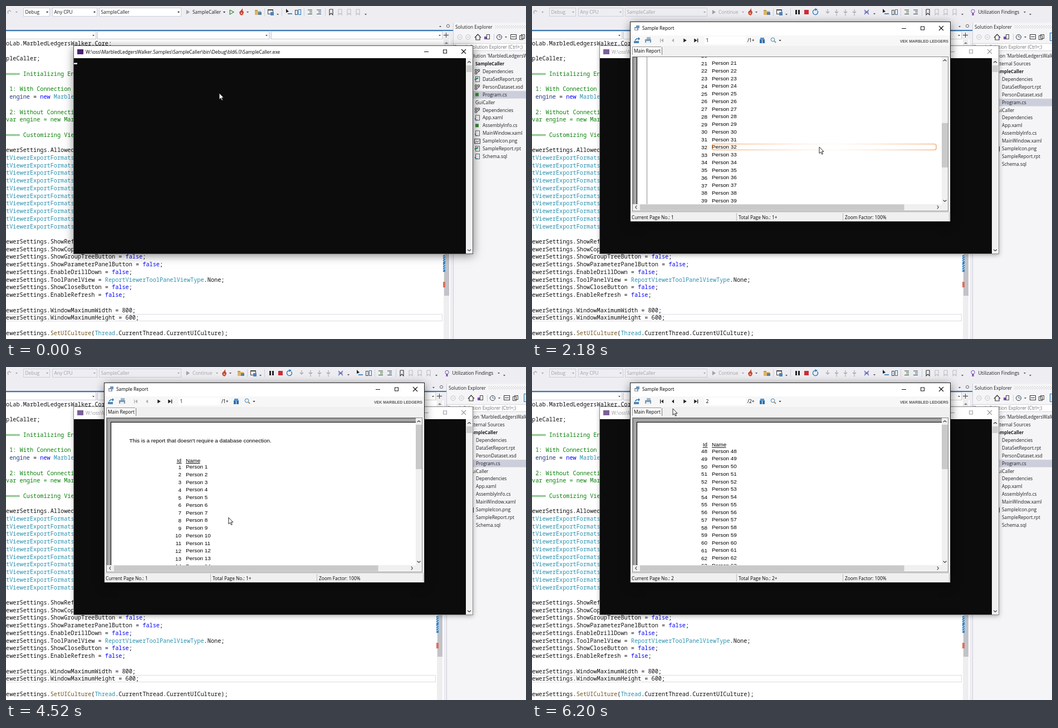
An HTML page with a canvas for the animation above (6280 ms loop, 934x600 px).

```html
<!DOCTYPE html>
<html lang="en">
<head>
<meta charset="utf-8">
<style>
html, body { margin: 0; width: 100%; height: 100%; overflow: hidden; background: #eeeef2; }
canvas { display: block; }
</style>
</head>
<body>
<canvas id="stage" width="934" height="600"></canvas>
<script>
const ctx = document.getElementById('stage').getContext('2d');
const LOOP = 6280, ROW = 13.75, TICK = 88;
const UI = '8.35px "Open Sans", sans-serif';
const UI_BOLD = 'bold 7.95px "Open Sans", sans-serif';
const REPORT = '9.8px "Liberation Sans", Arial, sans-serif';
const CODE = '10.23px "Noto Sans Mono", monospace';
const INK = '#1e1e1e', DIM = '#a2a2a6', CHROME = '#eeeef2', FACE = '#f0f0f0';

// Drawing helpers
function text(s, x, y, color = INK, font = UI, align = 'left') {
  ctx.font = font; ctx.fillStyle = color; ctx.textAlign = align;
  ctx.fillText(s, x, y);
}
function rect(x, y, w, h, color) { ctx.fillStyle = color; ctx.fillRect(x, y, w, h); }
function frame(x, y, w, h, color, lw = 1) {
  ctx.strokeStyle = color; ctx.lineWidth = lw;
  ctx.strokeRect(x + .5, y + .5, w - 1, h - 1);
}
function trace(p) {
  ctx.beginPath();
  for (let i = 0; i < p.length; i += 2) ctx.lineTo(p[i], p[i + 1]);
}
function line(color, lw, ...p) { trace(p); ctx.strokeStyle = color; ctx.lineWidth = lw; ctx.stroke(); }
function poly(color, ...p) { trace(p); ctx.closePath(); ctx.fillStyle = color; ctx.fill(); }
function circle(x, y, r, color, fill) {
  ctx.beginPath(); ctx.arc(x, y, r, 0, 7);
  if (fill) { ctx.fillStyle = color; ctx.fill(); }
  else { ctx.strokeStyle = color; ctx.lineWidth = 1; ctx.stroke(); }
}
const caret = (x, y, c = '#555') => poly(c, x - 2, y - 1, x + 2, y - 1, x, y + 1.5);
const play = (x, y, c, s = 4) => poly(c, x - s * .8, y - s, x + s * .8, y, x - s * .8, y + s);
const back = (x, y, c) => poly(c, x + 2, y - 3.5, x - 2, y, x + 2, y + 3.5);
const chevron = (x, y, dx, dy) =>
  line('#404040', 1.2, x - dx - 2.5 * dy, y - dy - 2.5 * dx, x + dx, y + dy, x - dx + 2.5 * dy, y - dy + 2.5 * dx);
function bars(x, y, c) {
  for (let i = 0; i < 4; i++) line(i % 3 ? c : '#444', 1, x - (i % 3 ? 1 : 4), y - 4 + i * 2.5, x + 4, y - 4 + i * 2.5);
}
function bookmark(x, c) { line(c, 1.1, x - 3, 6, x + 3, 6, x + 3, 16, x, 13, x - 3, 16, x - 3, 6); }
function folder(x) { rect(x - 6, 7, 5, 3, '#c89a3c'); rect(x - 6, 9, 11, 7, '#dcb667'); rect(x, 11, 6, 5, '#5b7fa6'); }
function windowIcon(x) { frame(x - 5, 6, 10, 9, '#444'); line('#444', 2, x - 5, 7, x + 5, 7); rect(x, 11, 6, 6, '#4d83bd'); }
function flame(x) { poly('#c8442f', x - 4, 11, x - 1, 8, x + 2, 4, x + 2, 8, x + 4, 11, x + 3, 15, x, 17, x - 3, 15); circle(x, 13, 1.5, '#f3b09a', true); }
function titleButtons(right, y, c) {
  line(c, 1, right - 88, y + .5, right - 80, y + .5);
  frame(right - 54, y - 3.5, 7, 7, c);
  line(c, 1.1, right - 21, y - 4, right - 13, y + 4);
  line(c, 1.1, right - 13, y - 4, right - 21, y + 4);
}
function shadowed(x, y, w, h, blur, alpha) {
  ctx.save();
  ctx.shadowColor = `rgba(0,0,0,${alpha})`; ctx.shadowBlur = blur; ctx.shadowOffsetY = 3;
  rect(x, y, w, h, '#fff');
  ctx.restore();
}

// Source editor: '|' splits runs, the first letter of each picks its colour
const COLORS = { k: '#111', g: '#078007', b: '#00f', t: '#2b91af', n: '#1f377f', m: '#74531f' };
const prop = (s) => 'kewerSettings.' + s;
const off = (s) => prop(s + ' = |bfalse|k;');
const LINES = [
  'koLab.MarbledLedgersWalker.Core;', '', 'kpleCaller;', '', 'g════ Initializing En', '',
  'g 1: With Connection', 'n engine|k = |bnew|t Marble', '',
  'g 2: Without Connecti', 'gvar engine = new Mar', '', 'g════ Customizing Vie', '',
  prop('Allowed'), ...Array(10).fill('ttViewerExportFormats'), '',
  prop('ShowRef'), prop('ShowCop'), off('ShowGroupTreeButton'), off('ShowParameterPanelButton'),
  off('EnableDrillDown'), prop('ToolPanelView = |tReportViewerToolPanelViewType|k.None;'),
  off('ShowCloseButton'), off('EnableRefresh'), '',
  prop('WindowMaximumWidth = 800;'), prop('WindowMaximumHeight = 600;'), '',
  prop('|mSetUICulture|k(|tThread|k.CurrentThread.CurrentUICulture);')
];
function editor(dx) {
  const right = 784 + dx;
  rect(0, 43, right + 19, 2, '#3b78b5');
  rect(0, 45, right + 14, 555, '#fff');
  rect(0, 45, right + 14, 15, CHROME);
  [[-2, 162], [164, 473], [476, right]].forEach(([a, b]) => {
    rect(a, 46, b - a, 13, '#fff'); frame(a, 45, b - a, 15, '#cccedb'); caret(b - 5, 53);
  });
  line('#444', 1.2, right + 2, 52.5, right + 11, 52.5);
  line('#444', 1, right + 6.5, 48, right + 6.5, 57);
  caret(right - 4, 37);
  circle(right + 10, 36, 2.6, '#666');
  rect(right + 2, 60, 10, 540, '#eeeef0');
  poly('#777', right + 4, 68, right + 7, 65, right + 10, 68);
  rect(right + 3, 74, 9, 448, '#c2c3c9');
  [449, 464].forEach((y) => {
    rect(right + 1, y, 4, 15, '#2f86c9');
    for (let k = 2; k < 14; k += 4) line('#fff', 1, right + 1, y + k + 2, right + 5, y + k - 1);
  });
  rect(right + 1, 497, 4, 10, '#d9705f');
  frame(-2, 555, right + 2, 13, '#dcdce4');
  LINES.forEach((row, i) => {
    let x = 0;
    for (const run of row.split('|')) {
      const s = run.slice(1);
      text(s, x, 71 + i * 13.73, COLORS[run[0]], (run[0] === 't' ? '500 ' : '') + CODE);
      x += ctx.measureText(s).width;
    }
  });
}

function toolbar(debugging) {
  rect(0, 0, 934, 43, CHROME);
  line(DIM, 1.2, 4, 14, 3, 10, 6, 8, 9, 10); caret(19, 11, DIM);
  const ink = debugging ? DIM : INK;
  [['Debug', 31, 79], ['Any CPU', 83, 164], ['SampleCaller', 167, 315]].forEach(([s, a, b]) => {
    if (!debugging) rect(a, 3, b - a, 15, '#fff');
    frame(a, 3, b - a, 16, '#cccedb'); text(s, a + 3.5, 14, ink); caret(b - 5, 11, ink);
  });
  play(327, 11, DIM);
  text(debugging ? 'Continue' : 'SampleCaller', 335, 14, ink);
  caret(debugging ? 379 : 392, 11, ink);
  if (!debugging) line('#388a34', 1.2, 402, 7, 409, 11, 402, 15, 402, 7);
  const a = debugging ? -31 : 0, b = debugging ? 127 : 0;
  flame(423 + a); caret(434 + a, 11); folder(453 + a); windowIcon(475 + a); caret(488 + a, 15);
  [464 + a, 495 + a, 535 + b, 573 + b].forEach((x) => line('#cccedb', 1, x + .5, 4, x + .5, 18));
  if (debugging) {
    rect(473, 7, 3, 8, '#222'); rect(478, 7, 3, 8, '#222'); rect(489, 7, 8, 8, '#d02b35');
    ctx.beginPath(); ctx.arc(509, 11, 4.5, -.7, 4.6);
    ctx.strokeStyle = '#2a75bb'; ctx.lineWidth = 1.4; ctx.stroke();
    poly('#2a75bb', 508, 4, 513, 6, 509, 9);
    [531, 547, 563, 579].forEach((x, i) => {
      line(DIM, 1.1, x, 6, x, 13); line(DIM, 1.1, x - 3, 10, x, 13, x + 3, 10);
      if (i) circle(x, 16, 1, DIM, true);
    });
    line('#7b4bb0', 1.2, 597, 7, 605, 15); line('#2a75bb', 1.2, 597, 15, 605, 7); line('#7b4bb0', 1, 597, 11, 605, 11);
    caret(615, 14);
    circle(792, 9.5, 3.2, '#7b4bb0'); rect(790.5, 13, 3, 4, '#7b4bb0');
    text('Utilization Findings', 801.5, 14); caret(885, 11); caret(895, 15);
  }
  poly('#222', 503 + b, 5, 503 + b, 12, 508 + b, 10); line('#2a75bb', 1.6, 506 + b, 14, 514 + b, 14);
  frame(519 + b, 7, 5, 9, '#444'); frame(525 + b, 6, 5, 10, '#2a75bb');
  bars(546 + b, 11, '#388a34'); bars(562 + b, 11, '#2a75bb');
  [584, 600, 616, 632].forEach((x, i) => bookmark(x + b, i ? '#bcbcc2' : '#333'));
  caret(646 + b, 15);
}

// Solution tree: label, indent, icon
const TREE = [
  ["Solution 'MarbledLedgersWalker'", 830], ['SampleCaller', 843], ['Dependencies', 856, 'deps'],
  ['DataSetReport.rpt', 856, 'report'], ['PersonDataset.xsd', 856, 'deps'], ['Program.cs', 856, 'code'],
  ['GuiCaller', 843], ['Dependencies', 856, 'deps'], ['App.xaml', 856, 'file'], ['AssemblyInfo.cs', 856, 'code'],
  ['MainWindow.xaml', 856, 'file'], ['SampleIcon.png', 856, 'image'], ['SampleReport.rpt', 856, 'report'], ['Schema.sql', 856, 'file']
];
const TREE_DEBUG = [TREE[0], ['External Sources', 843], ...TREE.slice(1)];
function treeIcon(kind, x, y) {
  if (kind === 'code') return rect(x - 3, y - 3, 6, 6, '#388a34');
  if (kind === 'deps') {
    frame(x - 4, y - 4, 4, 4, '#444'); frame(x + 1, y - 4, 4, 4, '#444'); frame(x - 4, y + 1, 4, 4, '#444');
    return line('#444', 1, x, y + 3, x + 4, y);
  }
  if (kind === 'image') { frame(x - 5, y - 4, 11, 9, '#444'); return line('#444', 1, x - 4, y + 3, x - 1, y, x + 1, y + 2, x + 4, y - 1); }
  frame(x - 3, y - 5, 8, 10, '#666');
  if (kind === 'report') line('#2d8f77', 2.4, x - 4, y + 1, x + 2, y - 2);
  else line('#2a75bb', 1.3, x - 4, y + 1, x - 2, y + 4, x + 1, y + 4);
}
function solutionPanel(dx) {
  ctx.save(); ctx.translate(dx, 0);
  rect(798, 45, 200, 555, CHROME);
  rect(803, 30, 200, 570, '#f5f5f7');
  line('#cccedb', 1, 803.5, 30, 803.5, 600);
  text('Solution Explorer', 807, 41);
  ctx.setLineDash([1, 3]);
  [35.5, 37.5, 39.5].forEach((y, i) => line('#aaa', 1, 879 + i % 2 * 2, y, 950, y));
  ctx.setLineDash([]);
  [815, 830].forEach((x) => { circle(x, 56, 4.2, '#c4c4ca'); line('#c4c4ca', 1, x - 2, 56, x + 2, 56); });
  line('#333', 1.2, 842, 57, 847.5, 51, 853, 57); line('#333', 1.2, 844, 56, 844, 61, 851, 61, 851, 56);
  rect(859, 55, 5, 5, '#7b4bb0'); frame(863, 51, 6, 9, '#444');
  line('#cccedb', 1, 876.5, 50, 876.5, 62);
  circle(886, 56, 4.5, '#333'); line('#2a75bb', 1, 886, 53, 886, 56, 889, 56); caret(898, 56);
  frame(906, 51, 11, 9, '#333'); line('#333', 1, 908, 55.5, 915, 55.5);
  frame(922, 53, 7, 8, '#444'); frame(925, 51, 7, 8, '#444');
  rect(942, 48, 15, 15, '#d7e8f7'); frame(942, 48, 15, 15, '#2a75bb');
  rect(804, 67, 150, 14, '#fff'); frame(804, 67, 150, 14, '#d5d5de');
  text('Search Solution Explorer (Ctrl+;)', 805, 77, '#717171');
  (dx ? TREE_DEBUG : TREE).forEach(([label, x, icon], i) => {
    const y = 90 + i * 13.93;
    if (label === 'Program.cs') rect(804, y - 6.5, 150, 13.5, '#cccedb');
    if (icon) treeIcon(icon, 846, y);
    text(label, x, y + 3, INK, label === 'SampleCaller' ? UI_BOLD : UI);
  });
  ctx.restore();
}

function terminal(active) {
  shadowed(122, 72, 717, 374, active ? 16 : 8, active ? .5 : .3);
  rect(122, 94, 704, 352, '#0c0c0c');
  rect(128, 78, 11, 9, active ? '#4b2373' : '#7d5f99');
  text('W:\\oss\\MarbledLedgersWalker.Samples\\SampleCaller\\bin\\Debug\\bld6.0\\SampleCaller.exe', 143, 86, active ? '#000' : '#999');
  titleButtons(839, 82, active ? '#111' : '#999');
  rect(826, 94, 12, 352, FACE);
  rect(827, 107, 10, 12, '#cdcdcd');
  chevron(832, 101, 0, -1.2); chevron(832, 440, 0, 1.2);
  frame(121, 71, 718, 376, active ? '#555' : '#8a8a8a');
  if (active) rect(122, 102.5, 6, 2.5, '#f2f2f2');
}

// Motion
const PATH = [
  [0, 383, 157], [520, 383, 157], [640, 325, 135], [1180, 392, 359], [1560, 392, 359], [1820, 516, 254],
  [2620, 516, 254], [2900, 470, 94], [3180, 440, 309], [3280, 440, 309], [3580, 401, 259], [4480, 401, 259],
  [4660, 392, 352], [5140, 305, 120], [5180, 305, 120], [5500, 274, 61], [5820, 274, 61], [6200, 253, 75]
];
function pointer(t) {
  const i = PATH.findIndex((k) => k[0] > t);
  if (i < 0) return PATH[PATH.length - 1].slice(1);
  const [t0, x0, y0] = PATH[i - 1], [t1, x1, y1] = PATH[i];
  const u = (t - t0) / (t1 - t0), e = u * u * (3 - 2 * u);
  return [x0 + (x1 - x0) * e, y0 + (y1 - y0) * e];
}
const WHEEL_DOWN = [1900, 1980, 2060, 2140, 2240, 2380];
const WHEEL_UP = [3720, 3800, 3880, 3980, 4080, 4180];
const passed = (list, t) => list.filter((v) => v <= t).length;
const scrollAt = (t) => TICK * (passed(WHEEL_DOWN, t) - passed(WHEEL_UP, t));

// The hovered row stays marked while the wheel turns back up
function hoveredRow(t) {
  const h = t > 3580 && t < 4540 ? 3580 : t;
  const [x, y] = pointer(h);
  const row = Math.round((y - 180 + scrollAt(h)) / ROW) + 1;
  return x >= 323 && x <= 726 && y > 92 && row >= 1 && row <= 47 ? row : 0;
}
function rowOutline(y) {
  const g = ctx.createLinearGradient(323, 0, 726, 0);
  [[0, 1], [.15, .8], [.4, .25], [.55, .08], [.75, .4], [1, 1]].forEach(([p, a]) => g.addColorStop(p, `rgba(245,150,75,${a})`));
  ctx.beginPath(); ctx.roundRect(323.5, y - 5.5, 402.5, 10.5, 3);
  ctx.strokeStyle = g; ctx.lineWidth = 1.2; ctx.stroke();
}
function page(t) {
  const second = t >= 5880, shift = second ? -28.5 : 0, first = second ? 48 : 1;
  ctx.save();
  ctx.beginPath(); ctx.rect(181, 92, 555, 265); ctx.clip();
  rect(181, 92, 555, 265, '#a4a4a4');
  frame(181, 92, 567, 278, '#666');
  ctx.translate(0, -scrollAt(t));
  rect(188, 99, 700, 775, '#fff'); frame(188, 99, 700, 775, '#111', 1.2);
  if (t < 5740 || second) {
    if (t < 2800) frame(206, 117, 600, 739, '#8c8c8c');
    if (!second) text("This is a report that doesn't require a database connection.", 221.5, 135.5, '#000', REPORT);
    text('Id', 315, 171.5 + shift, '#000', REPORT, 'right');
    text('Name', 323, 171.5 + shift, '#000', REPORT);
    rect(306.5, 173 + shift, 9, 1, '#000'); rect(323, 173 + shift, 25.5, 1, '#000');
    for (let i = 0; i < 47; i++) {
      const y = 183 + shift + i * ROW;
      text(first + i, 315, y + .5, '#000', REPORT, 'right');
      text('Person ' + (first + i), 323, y, '#000', REPORT);
    }
    const row = second ? 0 : hoveredRow(t);
    if (row) rowOutline(180 + (row - 1) * ROW);
  }
  ctx.restore();
}
function thumbColor(t) {
  if (t >= 1320 && t < 1380) return '#6a6a6a';
  return t >= 1380 && t < 1600 ? '#a6a6a6' : '#c9c9c9';
}
function reportWindow(t) {
  const n = t >= 5880 ? 2 : 1, nav = n > 1 ? '#222' : '#b0b0b0';
  shadowed(177, 29, 575, 360, 16, .55);
  rect(177, 53, 575, 336, FACE);
  rect(184, 38, 7, 6, '#8c9299'); rect(187, 35, 6, 5, '#6b94bd'); rect(185, 40, 4, 3, '#eee');
  text('Sample Report', 198, 43, '#000');
  titleButtons(752, 40, '#111');

  rect(178, 53, 573, 19, '#f7f7f7');
  rect(183, 63, 9, 4, '#4a86b8'); line('#2f74ad', 1.4, 185, 62, 188, 59, 192, 59); poly('#2f74ad', 191, 56, 194, 59, 191, 62);
  rect(203, 60, 11, 6, '#7796b0'); rect(206, 56, 7, 4, '#9eb6cb'); rect(205, 63, 7, 4, '#e6eef5');
  rect(230, 58.5, 1.3, 7, nav); back(234, 62, nav); back(253, 62, nav);
  play(275, 62, '#222', 3.5); play(294, 62, '#222', 3.5); rect(297, 58.5, 1.3, 7, '#222');
  rect(310, 55, 74, 14, '#fff');
  text(n, 312.5, 65, '#000'); text('/' + n + '+', 387, 65, '#000');
  rect(409, 60, 4, 7, '#2f6fae'); rect(414, 60, 4, 7, '#2f6fae'); rect(410, 57, 7, 4, '#5b93c8');
  circle(432.5, 60.5, 3.3, '#2f7fc1'); line('#b28a4b', 1.8, 435, 63, 438, 66); caret(445.5, 62, '#222');
  text('VEK MARBLED LEDGERS', 748, 66, '#5a5a5a', 'bold 7px "Liberation Sans", Arial, sans-serif', 'right');

  rect(180, 73, 53, 15, '#fafafa');
  line('#999', 1, 180.5, 88, 180.5, 73.5, 232, 73.5); line('#777', 1, 233.5, 74, 233.5, 88);
  text('Main Report', 183, 83.5, '#000');
  frame(180, 91, 568, 279, '#888');
  page(t);
  rect(736, 92, 11, 265, FACE);
  rect(736, 104 + scrollAt(t) * .3035, 11, 80, '#c9c9c9');
  chevron(741.5, 98, 0, -1.2); chevron(741.5, 351, 0, 1.2);
  rect(181, 357, 566, 12, FACE);
  rect(194, 357.5, 474.5, 10.5, thumbColor(t));
  chevron(187, 362.5, -1.2, 0); chevron(729, 362.5, 1.2, 0);
  rect(178, 371, 573, 1, '#c8c8c8');
  [367, 558, 749].forEach((x) => rect(x, 373, 1, 14, '#bbb'));
  text('Current Page No.: ' + n, 179, 384, '#000');
  text('Total Page No.: ' + n + '+', 371, 384, '#000');
  text('Zoom Factor: 100%', 562, 384, '#000');
  frame(176, 28, 576, 361, '#222');
}

function mouse(t) {
  const [x, y] = pointer(t);
  [1320, 5560].forEach((click) => {
    const age = t - click;
    if (age >= 0 && age < 120) circle(x - .5, y + 1.5, age < 60 ? 9 : 13.5, age < 60 ? 'rgba(228,212,30,.85)' : 'rgba(240,225,60,.35)', true);
  });
  ctx.save(); ctx.translate(x, y);
  poly('#fff', 0, 0, 0, 11.5, 2.7, 9, 4.6, 13.2, 6.4, 12.4, 4.6, 8.3, 8, 8.3);
  ctx.strokeStyle = '#111'; ctx.lineWidth = .9; ctx.stroke();
  ctx.restore();
}

function draw(now) {
  const t = now % LOOP, dx = t >= 280 ? -12 : 0, running = t >= 560;
  toolbar(t >= 220);
  editor(dx);
  solutionPanel(dx);
  terminal(!running);
  if (running) reportWindow(t);
  mouse(t);
  requestAnimationFrame(draw);
}
requestAnimationFrame(draw);
</script>
</body>
</html>
```
